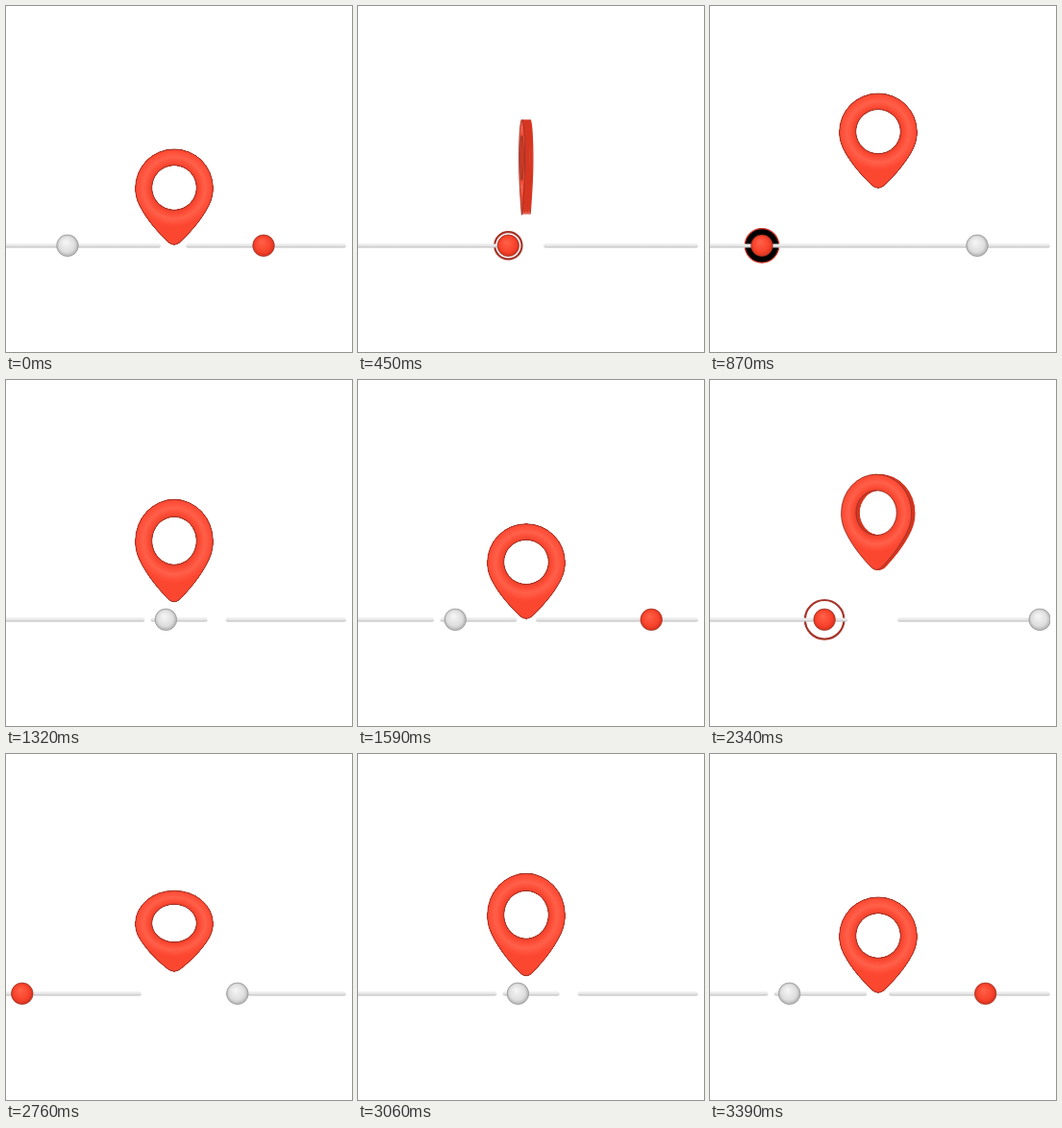
An HTML page with a canvas that plays this animation: 360 px wide and 360 px high, repeating every 3.42 s.

```html
<!DOCTYPE html>
<html lang="en">
<head>
<meta charset="utf-8">
<title>Bouncing map pin</title>
<style>
html, body { margin: 0; width: 100%; height: 100%; overflow: hidden; background: #fff; }
canvas { display: block; width: 360px; height: 360px; }
</style>
</head>
<body>
<canvas id="stage" width="360" height="360"></canvas>
<script>
const ctx = document.getElementById('stage').getContext('2d');
const LOOP = 3420, TICK = 30, STEPS = 46, SPAN = 428;
const GROUND = 248.5, ROD_Y = 249.5, PIN_X = 175, RIGHT = 354;
const IMPACT = 28, LANDED = 36;

const clamp01 = v => Math.min(1, Math.max(0, v));
const wrap = x => ((x + 20) % SPAN + SPAN) % SPAN - 20;
const rise = n => (1 - Math.cos(clamp01((n - 3.5) / 16.5) * Math.PI)) / 2;

// Eased jump, free fall, then one bounce under the same gravity.
function lift(n) {
  if (n < 23.1) return 59 * rise(n);
  if (n < IMPACT) return 60 - 2.5 * (n - 23.1) ** 2;
  if (n < LANDED) return 40 - 2.5 * (n - 32) ** 2;
  return 0;
}

// Vertical scale: squeezed into the impact, then a damped spring.
function stretch(n) {
  const d = n - IMPACT;
  const sway = d < 0 ? Math.exp(-((d / 3) ** 2))
    : clamp01(1 - d / 16) ** 1.5 * Math.cos(d * Math.PI / 7);
  return 1 - .17 * sway;
}

// Opening in the rod around the pin.
function gap(n) {
  if (n >= 20 && n < 25) return [PIN_X, PIN_X];
  if (n >= 25 && n < LANDED) return [141 + 8.6 * (n - 27), 228.5];
  const k = n < 20 ? n : n - STEPS;
  return [161 - 1.1 * k, 187 + .5 * k];
}

function circle(x, y, r) {
  ctx.beginPath();
  ctx.arc(x, y, r, 0, Math.PI * 2);
}

function outline(color, width) {
  ctx.strokeStyle = color;
  ctx.lineWidth = width;
  ctx.stroke();
}

function ball(x, light, mid, dark, edge) {
  const g = ctx.createRadialGradient(x - 2, 245.5, 1, x, 249.3, 12);
  g.addColorStop(0, light);
  g.addColorStop(.65, mid);
  g.addColorStop(1, dark);
  circle(x, 249.3, 11.3);
  ctx.fillStyle = g;
  ctx.fill();
  outline(edge, .6);
}

function rod(from, to) {
  if (to - from < 3) return;
  const g = ctx.createLinearGradient(0, 247, 0, 252);
  g.addColorStop(0, '#dedede');
  g.addColorStop(.4, '#f0f0f0');
  g.addColorStop(1, '#b0b0b0');
  ctx.fillStyle = g;
  ctx.beginPath();
  ctx.roundRect(from, ROD_Y - 2.1, to - from, 4.2, 2);
  ctx.fill();
}

function rods(n, whiteX) {
  const [a, b] = gap(n);
  if (a === b) return rod(-4, RIGHT);
  if (n > 30 && whiteX < a) {
    rod(-4, whiteX - 22);
    rod(whiteX - 16, a);
  } else {
    rod(-4, a);
  }
  rod(b, RIGHT);
}

function ring(n, x) {
  if (n < 10 || n > 26) return;
  const closing = n >= 20;
  circle(x, 249.3, 10 + 11.5 * Math.sin(Math.PI * (n - 10) / 17));
  if (closing) {
    ctx.fillStyle = '#000';
    ctx.fill();
  }
  outline(closing ? '#d8392b' : '#a5352a', closing ? 1.2 : 2.2);
}

// Pin outline with its tip at the origin.
function pinPath() {
  ctx.beginPath();
  ctx.moveTo(-5, -2);
  ctx.bezierCurveTo(-14, -10, -28, -25, -36, -41);
  ctx.bezierCurveTo(-39, -47, -40.3, -53, -40.3, -59);
  ctx.arc(0, -59.2, 40.3, Math.PI, 0);
  ctx.bezierCurveTo(40.3, -53, 39, -47, 36, -41);
  ctx.bezierCurveTo(28, -25, 14, -10, 5, -2);
  ctx.quadraticCurveTo(0, 1.5, -5, -2);
  ctx.closePath();
  ctx.moveTo(23.3, -59.5);
  ctx.arc(0, -59.5, 23.3, 0, Math.PI * 2);
}

function pin(n) {
  const angle = Math.PI * rise(n);
  const turn = Math.max(.05, Math.abs(Math.cos(angle)));
  const depth = 4.5 * Math.sin(angle) * (Math.cos(angle) < 0 ? -1 : 1);
  const face = ctx.createRadialGradient(0, -59.2, 23, 0, -59.2, 41);
  face.addColorStop(0, '#ea3f2a');
  face.addColorStop(.2, '#fc4a34');
  face.addColorStop(.5, '#ff604a');
  face.addColorStop(.85, '#ff4c36');
  face.addColorStop(1, '#fb4630');

  const layers = 12;
  for (let i = 0; i <= layers; i++) {
    const front = i === layers;
    ctx.save();
    ctx.translate(PIN_X + depth * (2 * i / layers - 1), GROUND - lift(n));
    ctx.scale(turn, stretch(n));
    pinPath();
    ctx.fillStyle = front ? face : '#d63722';
    ctx.fill('evenodd');
    ctx.restore();
    if (front) outline('#8a3226', .8);
  }
}

function draw(time) {
  const slot = Math.floor(time % LOOP / TICK);
  const n = Math.floor(slot * 4 / 5) % STEPS;
  const travel = n * SPAN / STEPS;
  const redX = wrap(268 - travel), whiteX = wrap(492 - travel);

  ctx.fillStyle = '#fff';
  ctx.fillRect(0, 0, 360, 360);
  ctx.save();
  ctx.beginPath();
  ctx.rect(0, 0, RIGHT, 360);
  ctx.clip();
  ring(n, redX);
  rods(n, whiteX);
  ball(whiteX, '#f4f4f4', '#dedede', '#a8a8a8', '#8c8c8c');
  ball(redX, '#ff5f46', '#f8432c', '#cc2d1b', '#8a3226');
  pin(n);
  ctx.restore();
}

const began = performance.now();
function loop() {
  draw(performance.now() - began);
  requestAnimationFrame(loop);
}
loop();
</script>
</body>
</html>
```
